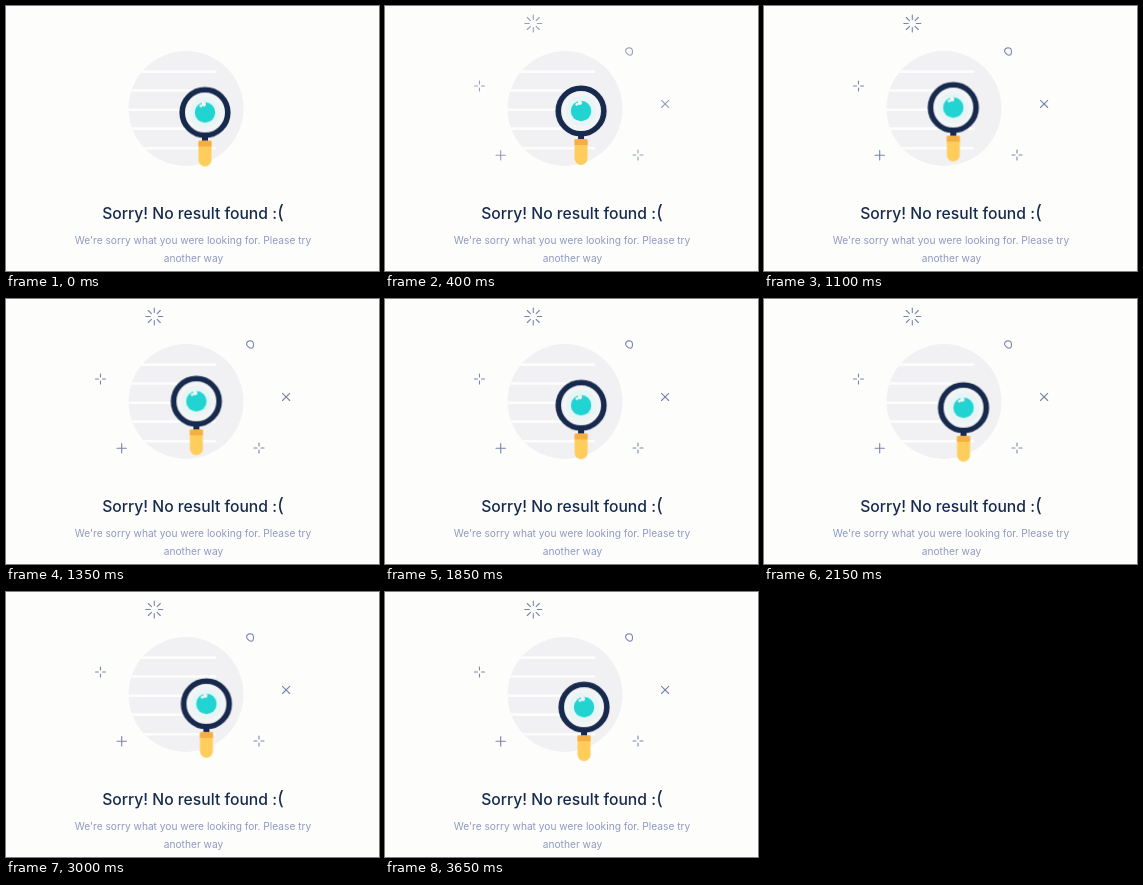
Write an HTML page that moves like this. It is 373x265 px and loops after 3700 ms.

```html
<!DOCTYPE html>
<html lang="en">
<head>
<meta charset="utf-8">
<title>No result found</title>
<style>
  html, body { margin: 0; width: 100%; height: 100%; overflow: hidden; background: #fdfefc; }
  svg { display: block; width: 373px; height: 265px; }
  text { font-family: Inter, "Open Sans", sans-serif; text-anchor: middle; }
  .title { font-size: 15.7px; font-weight: 500; fill: #172a4d; }
  .title .paren { font-size: 19px; font-weight: 400; }
  .note { font-size: 10.2px; fill: #8f98c0; }
  .lines { stroke: #fdfefc; stroke-width: 2.6; stroke-linecap: round; }
  .icons { fill: none; stroke: #7a84ab; stroke-width: 1.1; stroke-linecap: round;
           animation: appear 3.7s linear infinite; }
  .glass { animation: search 3.7s cubic-bezier(.37, 0, .63, 1) infinite; }

  @keyframes appear { 0%, 1.3% { opacity: 0; } 13.5%, 100% { opacity: 1; } }
  @keyframes search {
    0%   { transform: translate(199px, 106.5px); }
    29%  { transform: translate(189.3px, 101.5px); }
    67.6% { transform: translate(201.2px, 109.9px); }
    100% { transform: translate(199px, 115.2px); }
  }
</style>
</head>
<body>
<svg viewBox="0 0 373 265">
  <defs>
    <clipPath id="disc"><circle cx="180" cy="102.5" r="57.5"/></clipPath>
    <path id="spark" d="M0-5V-2M0 2V5M-5 0H-2M2 0H5"/>
    <path id="rays" d="M0-8.5V-4M0 4V8.5M-8.5 0H-4M4 0H8.5"/>
  </defs>

  <circle cx="180" cy="102.5" r="57.5" fill="#f1f1f3"/>
  <path class="lines" clip-path="url(#disc)"
        d="M134 65.6H209M120 84.5H209M120 103.7H209M120 122.6H209M137 142.3H209"/>

  <g class="icons">
    <use href="#rays" x="148.3" y="17.5"/>
    <use href="#rays" transform="translate(148.3 17.5) rotate(45)"/>
    <use href="#spark" x="94.5" y="80"/>
    <use href="#spark" x="253" y="149"/>
    <path d="M115.7 144.5V154M111 149.2H120.4"/>
    <path d="M276.5 94.3L283.7 101.5M283.7 94.3L276.5 101.5"/>
    <path d="M240.6 44.5Q241 42 244 41.8Q247.5 41.8 247.5 45.5Q247.5 49.3 245 49.3Q243.6 49.2 241.4 46.8Q240.4 45.6 240.6 44.5Z"/>
  </g>

  <g class="glass">
    <rect x="-3" y="24" width="6" height="6" fill="#172a4d"/>
    <path d="M-6.5 29.5Q-6.5 28.3-5.3 28.3H5.3Q6.5 28.3 6.5 29.5V47.5A6.5 6.5 0 0 1-6.5 47.5Z" fill="#ffcd5c"/>
    <path d="M-6.5 34V29.5Q-6.5 28.3-5.3 28.3H5.3Q6.5 28.3 6.5 29.5V34Z" fill="#f6ae42"/>
    <circle r="22.8" fill="#f3f4f5" stroke="#172a4d" stroke-width="5.6"/>
    <circle r="15" fill="#e6f5f5"/>
    <circle r="10.2" fill="#21d3d1"/>
    <g fill="#f1f9f8">
      <circle cx="-1.2" cy="-8.2" r="2.2"/>
      <circle cx="-4.2" cy="-6.6" r="1.4"/>
    </g>
  </g>

  <text class="title" x="187" y="212.5">Sorry! No result found :<tspan class="paren">(</tspan></text>
  <text class="note" x="187" y="238">We're sorry what you were looking for. Please try</text>
  <text class="note" x="187.5" y="255.5">another way</text>
</svg>
</body>
</html>
```
